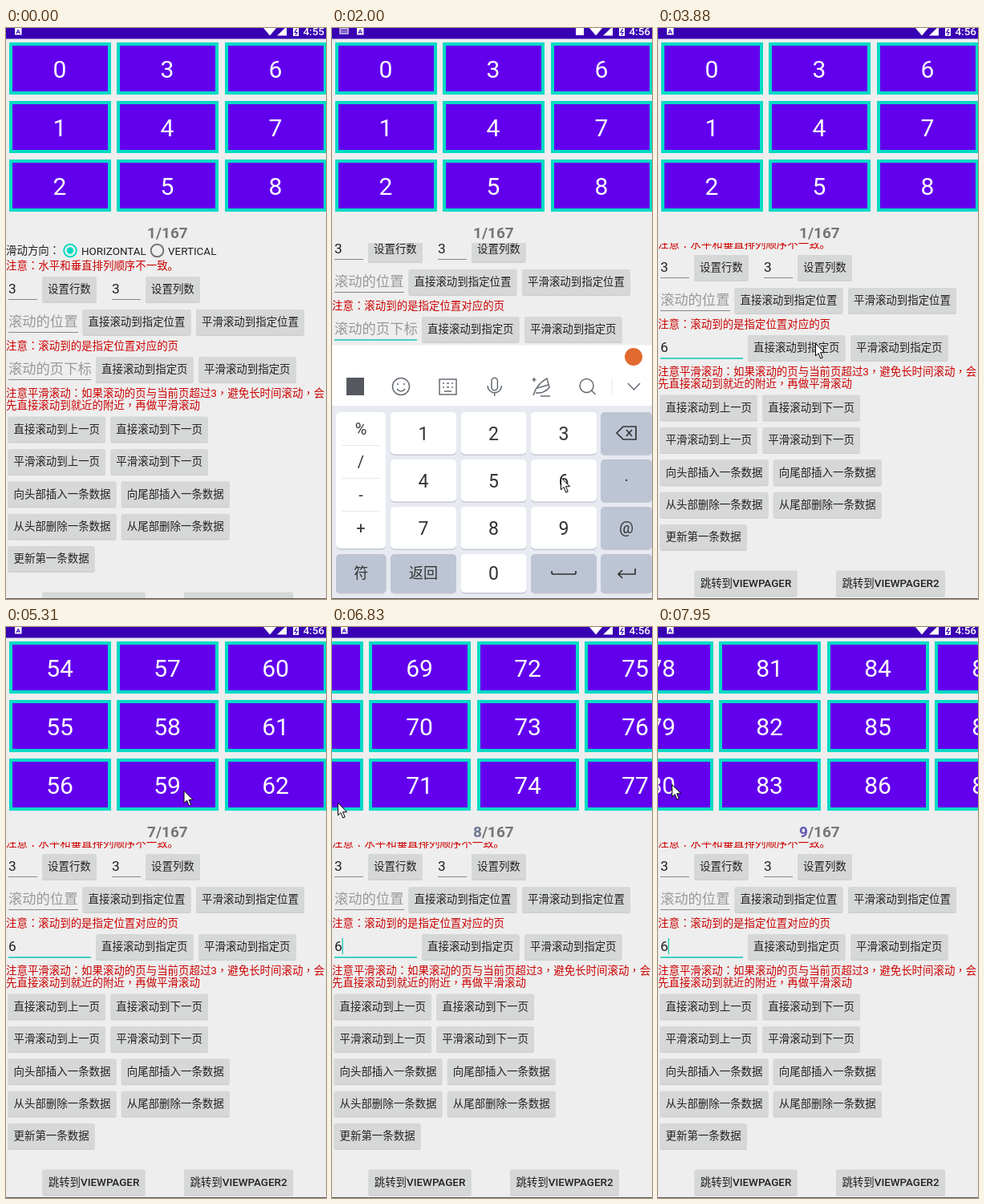
An HTML page with a canvas for the animation above (8 s loop, 399 by 712 pixels).

```html
<!DOCTYPE html>
<html lang="zh-CN">
<head>
<meta charset="utf-8">
<style>
html, body { margin: 0; width: 100%; height: 100%; overflow: hidden; background: #eee; }
canvas { display: block; }
</style>
</head>
<body>
<canvas id="stage" width="399" height="712"></canvas>
<script>
const g = document.getElementById('stage').getContext('2d');
const LOOP = 8000, COL = 134.5, TEAL = '#03dac5', INK = '#212121', RED = '#cc0000', ICON = '#666b73';
const FONT = 'Roboto, "Noto Sans CJK SC", "Noto Sans CJK", sans-serif';
const CENTERED = '"Noto Sans CJK TC", "Noto Sans CJK", sans-serif';

// Pointer: [time, x, y]
const POINTER = [
  [130, 120, 715], [690, 38, 419], [890, 38, 420], [1400, 38, 420], [1860, 270, 549], [2000, 285, 560],
  [2450, 285, 560], [2970, 366, 450], [3110, 367, 452], [3420, 367, 452], [3800, 196, 393], [4550, 196, 393],
  [5100, 220, 200], [5380, 222, 205], [5600, 222, 205], [5850, 42, 222], [6180, 42, 222],
  [6400, 170, 206], [6590, 170, 206], [6780, 7, 219], [7080, 7, 219], [7390, 178, 169],
  [7540, 180, 168], [7740, 17, 196]
];
const PRESSES = [[1090, 1240], [2200, 2340], [3110, 3330], [4350, 4490], [5380, 5860], [6420, 6780], [7470, 7740]];
const SWIPES = [5560, 6560, 7460];
const SWIPE = [[80, 0], [220, 175], [270, 226], [450, 308.5], [570, 375], [720, 403.5]];

function track(points, t) {
  const i = points.findIndex(p => p[0] > t);
  if (i < 0) return points[points.length - 1].slice(1);
  if (i === 0) return points[0].slice(1);
  const a = points[i - 1], b = points[i], k = (t - a[0]) / (b[0] - a[0]);
  return a.slice(1).map((v, n) => v + (b[n + 1] - v) * k);
}
const ease = k => { k = Math.min(1, Math.max(0, k)); return 1 - (1 - k) ** 2; };

function rect(x, y, w, h, color) { g.fillStyle = color; g.fillRect(x, y, w, h); }
function round(x, y, w, h, r, color) {
  g.fillStyle = color;
  g.beginPath(); g.roundRect(x, y, w, h, r); g.fill();
}
function text(s, x, cy, size, color, align = 'left', weight = 400) {
  g.font = `${weight} ${size}px ${FONT}`;
  g.textAlign = align;
  g.fillStyle = color;
  g.fillText(s, x, cy + size * 0.36);
}
// Running text whose colons and commas sit in the middle of their cell.
function prose(s, cy, color) {
  let x = 0;
  g.textAlign = 'left';
  g.fillStyle = color;
  for (const part of s.split(/([：，])/)) {
    g.font = `13.44px ${/^[：，]/.test(part) ? CENTERED : FONT}`;
    g.fillText(part, x, cy + 4.84);
    x += g.measureText(part).width;
  }
}
function path(d, color, width) {
  const p = new Path2D(d);
  if (width) { g.strokeStyle = color; g.lineWidth = width; g.stroke(p); }
  else { g.fillStyle = color; g.fill(p); }
}
function circle(x, y, r, color, width) {
  g.beginPath(); g.arc(x, y, r, 0, 7);
  if (width) { g.strokeStyle = color; g.lineWidth = width; g.stroke(); }
  else { g.fillStyle = color; g.fill(); }
}

function statusBar(t, typing) {
  rect(0, 0, 399, 13.5, '#3700b3');
  const ax = typing ? 31 : 11;
  rect(ax, 0, 8.5, 8.5, '#fff');
  text('A', ax + 4.2, 4.2, 8, '#3700b3', 'center', 700);
  if (typing) {
    round(9, 0, 12, 8, 1, '#b5a3dd');
    path('M11 2.5H19M11 5H19', '#3700b3', 1);
    rect(304, 0, 10, 9, '#fff');
  }
  path('M321 0H337L329 9.5ZM338 9.5H350V-2ZM358 0H365V10H358Z', '#fff');
  path('M362.5 1L360 5.5H363L361 9', '#3700b3', 1.2);
  text(t < 300 ? '4:55' : '4:56', 397, 4.5, 13.5, '#fff', 'right', 500);
}

function grid(scroll) {
  const first = Math.max(0, Math.floor(scroll / COL) - 1);
  for (let c = first; c < first + 6; c++) {
    const x = Math.round(3.9 + c * COL - scroll);
    for (let r = 0; r < 3; r++) {
      const y = 18 + r * 73;
      rect(x, y, 127, 65, TEAL);
      rect(x + 4, y + 4, 119, 57, '#6200ee');
      text(c * 3 + r, x + 63, y + 33.5, 30, '#fff', 'center');
    }
  }
}

function counter(page) {
  const color = { 8: '#6c7791', 9: '#6259b4' }[page] || '#757575';
  text(page, 176, 255, 19, color, 'left', 700);
  text('/167', 176 + g.measureText(page).width, 255, 19, '#757575', 'left', 700);
}

function button(x, cy, label, w) {
  w = w || label.length * 13.44 + 14;
  round(x, cy - 14.5, w, 32, 2, 'rgba(0,0,0,.13)');
  round(x, cy - 15.5, w, 31.5, 2, '#d6d7d7');
  text(label, x + w / 2, cy, 13.44, INK, 'center', 500);
}
function field(x, cy, w, value, hint, focus) {
  text(value || hint, x, cy - 0.5, 17.3, value ? INK : '#999');
  rect(x, cy + 12.5, w, focus ? 1.8 : 1, focus ? '#32cdbd' : '#888');
}

function form(offset, t) {
  g.save();
  g.beginPath(); g.rect(0, 268, 399, 444); g.clip();
  g.translate(0, -offset);
  prose('滑动方向：', 277.5, INK);
  circle(80, 277.5, 7.8, TEAL, 2);
  circle(80, 277.5, 4.3, TEAL);
  text('HORIZONTAL', 94, 278, 13.44, INK);
  circle(188.5, 277.5, 7.8, '#757575', 2);
  text('VERTICAL', 202, 278, 13.44, INK);
  prose('注意：水平和垂直排列顺序不一致。', 296, RED);
  field(3, 325.5, 36, '3');
  button(45, 325.5, '设置行数');
  field(132, 325.5, 36, '3');
  button(174, 325.5, '设置列数');
  field(3, 366.5, 87, '', '滚动的位置');
  button(95.5, 366.5, '直接滚动到指定位置');
  button(237, 366.5, '平滑滚动到指定位置');
  prose('注意：滚动到的是指定位置对应的页', 396, RED);
  field(3, 425.5, 103, t > 2270 ? '6' : '', '滚动的页下标', t > 1160);
  if (t > 4350 && Math.floor(t / 500) % 2) rect(12.5, 415, 1.5, 20, '#32cdbd');
  button(112, 425.5, '直接滚动到指定页');
  button(240, 425.5, '平滑滚动到指定页');
  prose('注意平滑滚动：如果滚动的页与当前页超过3，避免长时间滚动，会', 455, RED);
  prose('先直接滚动到就近的附近，再做平滑滚动', 470.5, RED);
  [['直接滚动到上一页', '直接滚动到下一页'], ['平滑滚动到上一页', '平滑滚动到下一页'],
   ['向头部插入一条数据', '向尾部插入一条数据'], ['从头部删除一条数据', '从尾部删除一条数据'],
   ['更新第一条数据']].forEach((pair, i) => pair.forEach((s, n) =>
    button(2.5 + n * (s.length * 13.44 + 20.3), 500 + i * 40.4, s)));
  button(45.5, 719, '跳转到VIEWPAGER', 128);
  button(222, 719, '跳转到VIEWPAGER2', 136);
  g.restore();
}

function key(x, y, w, label, gray, size = 23) {
  const h = y > 650 ? 48 : 52.5;
  round(x, y + 1.5, w, h, 5, '#c3c8d3');
  round(x, y, w, h, 5, gray ? '#bdc4d3' : '#fff');
  text(label, x + w / 2, y + h / 2, size, '#333', 'center');
}

function keyboard(dy, t) {
  g.save();
  g.translate(0, dy);
  rect(0, 395.5, 399, 75.5, '#fff');
  rect(0, 471, 399, 241, '#e7eaf1');
  circle(376, 410, 11, '#e06a30');
  rect(18, 436, 22, 22, '#55585f');
  circle(86, 447, 10.5, ICON, 1.5);
  path('M81 450Q86 456 91 450M82 443V445M90 443V445', ICON, 1.5);
  path('M134 438H155V457H134ZM138 443H140M143 443H146M149 443H151M138 448H140M143 448H146M149 448H151M140 453H149', ICON, 1.5);
  path('M199 440A3.7 3.7 0 0 1 206.4 440V448A3.7 3.7 0 0 1 199 448ZM194 446A8.7 8.7 0 0 0 211.5 446M202.7 455V459', ICON, 1.5);
  path('M251 458Q255 444 268 437L271 448Q265 456 254 455M256 449L270 445M260 459H272M252 436V441M249.5 438.5H254.5', ICON, 1.5);
  circle(317.5, 446, 8.5, ICON, 1.5);
  path('M323.5 452L328.5 457M369 443L376.5 451L384 443', ICON, 1.5);
  rect(348.5, 436, 1, 22, '#e7e7ea');

  round(5, 480.5, 62, 170, 5, '#c3c8d3');
  round(5, 479, 62, 170, 5, '#fff');
  ['%', '/', '-', '+'].forEach((s, i) => {
    text(s, 36, 499.5 + i * 41, 20, '#333', 'center');
    if (i < 3) rect(12, 520 + i * 41, 48, 1, '#e8e8ec');
  });
  for (let i = 0; i < 9; i++)
    key(73 + i % 3 * 87.5, 479 + Math.floor(i / 3) * 59, 82, i + 1, i === 5 && t > 2200 && t < 2340);
  ['', '·', '@'].forEach((s, i) => key(335, 479 + i * 59, 64, s, true, 20));
  key(5, 656, 62.5, '符', true, 18);
  key(73, 656, 82, '返回', true, 18);
  key(160.5, 656, 82, '0');
  key(248, 656, 82, '', true);
  key(335, 656, 64, '', true);
  path('M355 505L363 497H379V513H363ZM367 501L374 509M374 501L367 509', '#333', 1.7);
  path('M274 677V679Q274 681 276 681H302Q304 681 304 679V677', '#333', 1.7);
  path('M378 674V681H357M362 676L357 681L362 686', '#333', 1.7);
  g.restore();
}

function pointer(t) {
  if (t < 130) return;
  const [x, y] = track(POINTER, t);
  if (PRESSES.some(([a, b]) => t >= a && t < b)) circle(x - 0.5, y, 15, 'rgba(240,235,40,.65)');
  g.save();
  g.translate(x, y);
  const arrow = 'M.5 .5V16L4 12.5L6.7 19L9.2 18L6.5 11.7H11.5Z';
  path(arrow, '#fff');
  path(arrow, '#000', 1);
  g.restore();
}

function draw(t) {
  const jumped = t >= 4420;
  let scroll = jumped ? 18 * COL : 0, page = jumped ? 7 : 1;
  for (const start of SWIPES) {
    scroll += track(SWIPE, t - start)[0];
    if (t - start > 650) page++;
  }
  const opening = ease((t - 1230) / 220), closing = ease((t - 3260) / 250);
  const offset = t < 3260 ? 50 * opening : 50 - 23 * closing;
  rect(0, 0, 399, 712, '#eee');
  grid(scroll);
  counter(page);
  form(offset, t);
  const lift = opening - closing;
  if (lift > 0) keyboard(317 * (1 - lift), t);
  statusBar(t, t > 1230 && t < 3400);
  rect(0, 711, 399, 1, '#55565c');
  pointer(t);
}

function frame() {
  draw(performance.now() % LOOP);
  requestAnimationFrame(frame);
}
frame();
</script>
</body>
</html>
```
